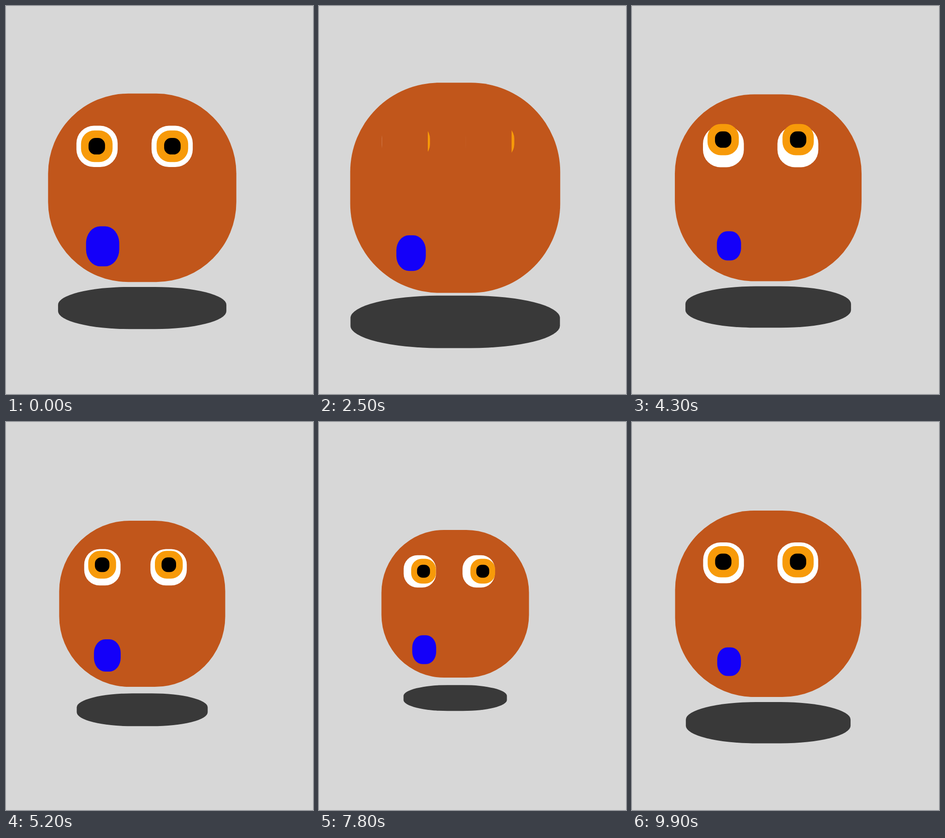
Write an HTML page that moves like this. It is 666 px wide and 841 px high and loops after 10 s.

```html
<!DOCTYPE html>
<html lang="en">
<head>
<meta charset="utf-8">
<title>Breathing face</title>
<style>
  html, body { margin: 0; width: 100%; height: 100%; overflow: hidden; background: #d7d7d7; }
  svg { display: block; width: 100%; height: 100%; }
</style>
</head>
<body>
<svg id="stage" viewBox="0 0 666 841"></svg>
<script>
const LOOP = 10000, STEP = 100, LEAD = 1880;
const HEAD = { x: 295.5, y: 394, r: 228.4 };
const stage = document.getElementById('stage');

function addRect(fill) {
  const rect = document.createElementNS('http://www.w3.org/2000/svg', 'rect');
  rect.setAttribute('fill', fill);
  stage.appendChild(rect);
  return rect;
}

// Places a rect by centre and half sizes; corner is the radius share of each side.
function place(rect, cx, cy, hw, hh, corner = 0.425) {
  const box = {
    x: cx - hw, y: cy - hh, width: 2 * hw, height: 2 * hh,
    rx: 2 * hw * corner, ry: 2 * hh * corner
  };
  for (const name in box) rect.setAttribute(name, box[name].toFixed(3));
}

// The CSS "ease" curve: cubic-bezier(.25, .1, .25, 1).
function ease(p) {
  if (p <= 0) return 0;
  if (p >= 1) return 1;
  const curve = (a, b, u) => 3 * a * u * (1 - u) ** 2 + 3 * b * u * u * (1 - u) + u ** 3;
  let low = 0, high = 1;
  for (let i = 0; i < 30; i++) {
    const mid = (low + high) / 2;
    if (curve(0.25, 0.25, mid) < p) low = mid; else high = mid;
  }
  return curve(0.1, 1, low);
}

// Eases 0 to 1 in the first half of the period and back in the second.
function swing(t, period) {
  const p = (t % period) / period * 2;
  return p < 1 ? ease(p) : 1 - ease(p - 1);
}

// Moves between [time, value] keys, eased within each span.
function track(keys, t) {
  let [lastTime, lastValue] = keys[0];
  for (const [time, value] of keys) {
    if (t < time) return lastValue + (value - lastValue) * ease((t - lastTime) / (time - lastTime));
    [lastTime, lastValue] = [time, value];
  }
  return lastValue;
}

const GAZE = 6000;
const gazeX = [[0, 0], [400, 0], [1140, -15], [2340, 17], [2600, 17], [3600, 0]];
const gazeY = [[0, 0], [3820, 0], [4470, -17.8], [4800, -17.8], [5900, 0]];
const lidDrop = [[0, 0], [2250, 0], [2450, 1], [2550, 1], [2750, 0]];
const lipHeight = [[0, 1], [6050, 1], [6250, 0.025], [6350, 0.025], [6550, 1]];

const shadow = addRect('#393939');
const head = addRect('#c1561b');
const eyes = [[-109.6, -0.6], [72.6, 0.6]].map(([x, shift]) => ({
  x, shift,
  white: addRect('#fff'),
  iris: addRect('#f79a09'),
  pupil: addRect('#000'),
  lid: addRect('#c1561b')
}));
const mouth = addRect('#1400f9');

function draw(t) {
  const scale = 0.7 + 0.3 * swing(t + LEAD, LOOP);
  const inHead = (rect, x, y, hw, hh, corner) =>
    place(rect, HEAD.x + x * scale, HEAD.y + y * scale, hw * scale, hh * scale, corner);

  inHead(head, 0, 0, HEAD.r, HEAD.r);
  inHead(shadow, 0, 291.4, HEAD.r * scale, HEAD.r / 4 * scale);

  const dx = track(gazeX, t % GAZE), dy = track(gazeY, t % GAZE) - 0.4;
  const drop = 51 * track(lidDrop, t);
  const eyeY = -100.3;
  for (const { x, shift, white, iris, pupil, lid } of eyes) {
    inHead(white, x, eyeY, 50, 50);
    inHead(iris, x + shift + dx, eyeY + dy, 38.3, 38.3);
    inHead(pupil, x + shift + dx, eyeY + dy, 20, 20);
    inHead(lid, x, eyeY - 51 + drop, 50, drop, 0);
  }

  const open = 0.7 + 0.3 * swing(t + LEAD, 6000);
  inHead(mouth, -96, 142, 41.5 * open, 50 * open * track(lipHeight, t));
}

function tick(now) {
  draw(Math.floor(((now + 5) % LOOP) / STEP) * STEP);
  requestAnimationFrame(tick);
}
draw(0);
requestAnimationFrame(tick);
</script>
</body>
</html>
```
